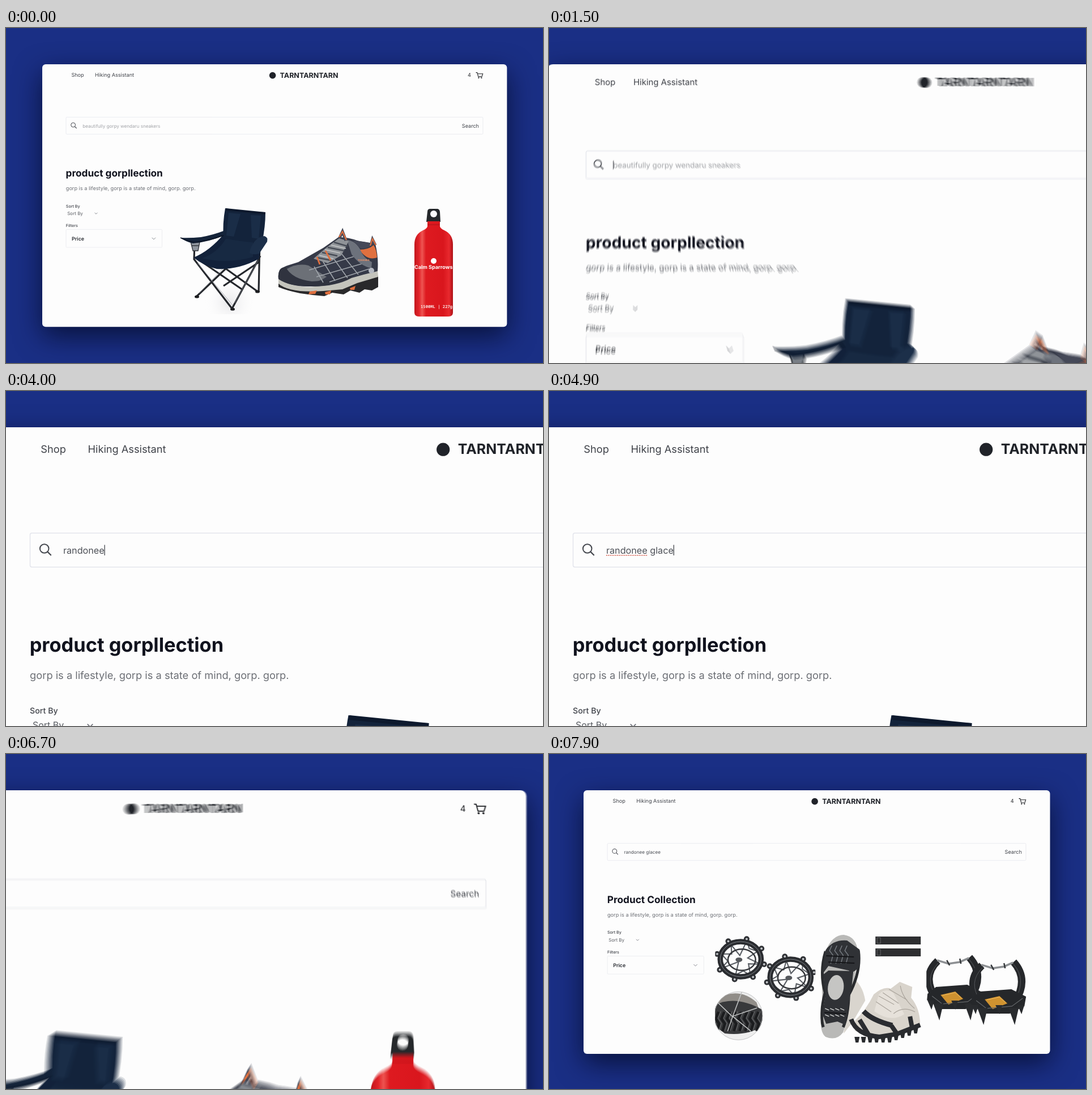
An HTML page with a canvas that plays this animation: 948x591 px, repeating every 8 s.

```html
<!DOCTYPE html>
<html lang="en">
<head>
<meta charset="utf-8">
<title>Shop search</title>
<style>
html, body { margin: 0; width: 100%; height: 100%; overflow: hidden; background: #1a2f85; }
canvas { display: block; }
</style>
</head>
<body>
<canvas id="stage" width="948" height="591"></canvas>
<script>
const W = 948, H = 591, LOOP = 8000;
const screen2d = document.getElementById('stage').getContext('2d');
const buffer = document.createElement('canvas');
buffer.width = W;
buffer.height = H;
const c = buffer.getContext('2d');

const CLICK = 1400, TYPE = 2700, KEY = 150, SUBMIT = 6450, RESULTS = 7550;
const QUERY = 'randonee glacee';
const INK = '#3f4249', BLACK = '#24262a';

// --- drawing helpers ---
function fill(color, d) {
  c.fillStyle = color;
  c.fill(new Path2D(d));
}
function line(color, w, d) {
  c.strokeStyle = color;
  c.lineWidth = w;
  c.stroke(new Path2D(d));
}
function oval(color, x, y, rx, ry = rx, turn = 0) {
  c.fillStyle = color;
  c.beginPath();
  c.ellipse(x, y, rx, ry, turn, 0, 7);
  c.fill();
}
function ring(color, w, x, y, rx, ry = rx) {
  c.strokeStyle = color;
  c.lineWidth = w;
  c.beginPath();
  c.ellipse(x, y, rx, ry, 0, 0, 7);
  c.stroke();
}
function text(str, x, y, size, color, weight = 400, family = 'Inter, sans-serif') {
  c.font = `${weight} ${size}px ${family}`;
  c.fillStyle = color;
  c.fillText(str, x, y);
  return c.measureText(str).width;
}
function box(x, y, w, h, r, color) {
  c.strokeStyle = color;
  c.lineWidth = 0.6;
  c.beginPath();
  c.roundRect(x, y, w, h, r);
  c.stroke();
}
const chevron = (x, y, r) => line('#6d7078', 0.8, `M${x - r} ${y - r / 2}l${r} ${r}l${r} ${-r}`);

function clipped(x, y, w, h, draw) {
  c.save();
  c.beginPath();
  c.rect(x, y, w, h);
  c.clip();
  draw();
  c.restore();
}

// --- camera ---
function spring(t, start, speed) {
  const u = Math.max(0, t - start) * speed / 1000;
  return 1 - (1 + u) * Math.exp(-u);
}
const zoom = t => 1 + spring(t, 1144, 6.1) - spring(t, 6493, 5.5);
const focus = t => 169.5 + 687.5 * spring(t, 5950, 7);
const shiftX = t => focus(t) * (1 - zoom(t));

// --- products before the search ---
function chair() {
  const glow = c.createRadialGradient(395, 485, 5, 395, 485, 45);
  glow.addColorStop(0, '#ececee');
  glow.addColorStop(1, '#fdfdfd00');
  c.fillStyle = glow;
  c.fillRect(345, 455, 100, 50);
  line('#24272c', 3.2, 'M333 378L332 408L399 495L449 402M337 473L398 415M443 464L376 416M449 330L446 466M345 412L418 462M448 412L384 455');
  line('#8b9098', 0.7, 'M338 415L400 489M445 410L404 485M341 468L392 415');
  for (const [x, y] of [[337, 474], [400, 496], [444, 465]]) oval('#1c1d20', x, y, 4, 2.6);
  fill('#8f959d', 'M326 377l16 1l-3 15h-9z');
  line('#33373d', 1.4, 'M326 377l16 1l-3 15h-9zM328 384h13');
  fill('#12213a', 'M384 364Q360 393 331 405Q350 420 372 425Q410 427 447 407L452 366z');
  fill('#172942', 'M388 372Q372 398 346 406Q390 417 436 404L436 374z');
  fill('#13233b', 'M387 318Q420 324 458 325Q458 350 452 379Q420 378 384 371Q382 345 387 318z');
  fill('#1a2d47', 'M393 326L414 328L402 368L389 366zM432 330L450 331L446 372L434 370z');
  fill('#0d192d', 'M388 318L458 325L457 329L387 322z');
  fill('#15243a', 'M308 370Q324 371 344 369Q366 365 384 358L384 366Q360 377 330 380Q317 377 308 370z');
  line('#0b1424', 1.4, 'M308 370Q324 378 336 378Q362 374 384 366');
  fill('#1c2f49', 'M431 391Q439 369 456 367Q463 369 461 377L447 398Q437 401 430 397z');
}

function shoe() {
  fill('#29292b', 'M481 446Q500 462 530 464L600 450L657 437V457L646 463L633 461L624 467L608 463L596 470L576 467L562 473L541 471L519 468Q495 463 481 457z');
  fill('#c4c4bc', 'M481 441Q505 457 538 457Q585 452 612 437Q636 430 656 426L657 439L620 450L594 461L560 464Q500 468 481 451z');
  fill('#e0703f', 'M536 465l13-2l-3 6l-12 1zM563 466l11-3l-2 7h-8zM607 459l10-4l-2 7h-7z');
  // Upper, from toe to collar and heel.
  fill('#363a48', 'M481 442Q478 424 500 418L516 413L560 388L587 369Q605 369 623 376Q640 378 652 381Q658 405 656 429Q634 434 610 441Q583 456 540 456Q500 457 481 442z');
  fill('#6c7077', 'M494 426Q514 414 534 419L566 439Q550 451 525 449Q502 446 494 426z');
  fill('#30333f', 'M481 443Q479 421 494 422Q505 443 540 447Q572 447 602 433L612 439Q584 455 541 456Q500 456 481 443z');
  line('#9fa4aa', 1.6, 'M544 421L560 449M559 411L581 446M575 402L603 441M593 399L622 435M535 427L628 399M548 439L635 414M571 448L641 425');
  fill('#e0703f', 'M624 391Q640 391 649 383Q654 390 655 405Q637 411 624 391z');
  fill('#6d727c', 'M602 374Q616 375 625 390Q631 407 646 413L645 424Q624 419 610 399z');
  fill('#454958', 'M611 374Q632 377 648 381Q640 390 626 389z');
  text('TOVANDA', 621, 411, 4.2, '#f29369', 700);
  oval('#b6bac2', 645, 428, 5);
  fill('#8f9398', 'M543 407Q566 386 588 371L605 376L592 401L568 415z');
  line('#484d57', 2.6, 'M549 405l25 5M558 396l27 6M568 387l29 6M579 378l24 7');
  line('#c8cacb', 1.5, 'M553 401l25 6M563 391l27 6M574 383l26 6');
  line('#e0703f', 2.8, 'M549 404l5 13M564 393l9 17');
  line('#454958', 5, 'M589 370l5-11l6 16M644 384l3-11l5 10');
  line('#e0703f', 2.2, 'M588 369l6-10l7 15M643 384l4-12l6 11');
}

function bottle() {
  fill('#25282b', 'M742 342l2-18q0-5 5-5h12q4 0 5 5l1 18z');
  oval('#fbfbfb', 755, 328, 6);
  const red = c.createLinearGradient(721, 0, 789, 0);
  [[0, '#c3161c'], [0.12, '#e3242a'], [0.2, '#ee5552'], [0.3, '#de1a20'], [0.75, '#d9161d'], [0.9, '#e8292e'], [1, '#ab1117']]
    .forEach(stop => red.addColorStop(...stop));
  fill(red, 'M744 341h22v9q1 4 8 7q15 7 15 25v120q0 7-8 7h-52q-8 0-8-7v-120q0-18 15-25q7-3 8-7z');
  line('#a5141a', 1, 'M744 347h22');
  oval('#ffffff', 755, 411, 5);
  clipped(721, 400, 67, 106, () => {
    text('Calm Sparrows', 721, 425, 9.1, '#fff', 700);
    text('1500ML | 227g', 732, 494, 7.2, '#f9dedc', 700, '"Noto Sans Mono", monospace');
  });
}

// --- products after the search ---
function chainRing(x, y, rx, ry, turn) {
  const at = (a, k) => [x + rx * k * Math.cos(a), y + ry * k * Math.sin(a)];
  let chain = '';
  for (let i = 0; i < 8; i++) {
    const a = turn + i * Math.PI / 4, reach = 0.4 + 0.25 * Math.sin(i * 2.3);
    const [px, py] = at(a, 1.02), [qx, qy] = at(a + 0.35, reach), [ex, ey] = at(a + 0.8, 0.8);
    chain += `M${px} ${py}L${qx} ${qy}L${ex} ${ey}`;
    oval('#303236', px, py, 5);
  }
  line('#5c6066', 2.2, chain);
  ring('#2a2c30', 9.5, x, y, rx * 0.86, ry * 0.86);
  ring('#8b8f93', 0.9, x, y, rx * 0.86, ry * 0.86);
  ring('#36383c', 2.5, x + 2, y + 1, rx * 0.58, ry * 0.52);
  for (let i = 0; i < 8; i++) {
    const [px, py] = at(turn + i * Math.PI / 4, 1.02);
    oval('#c2c5c8', px, py, 1.9);
  }
  oval('#55585c', x - 3, y + 1, 6, 4);
}

function chains() {
  chainRing(338, 362, 42, 36, 0.25);
  chainRing(426, 394, 42, 37, 0.55);
  c.save();
  c.beginPath();
  c.arc(334, 462, 43, 0, 7);
  c.clip();
  fill('#eeeeee', 'M290 418h90v90h-90z');
  fill('#918d88', 'M290 435Q333 408 366 438L372 455L290 462z');
  fill('#38393b', 'M290 444Q328 424 376 451L379 479Q350 498 310 493L290 478z');
  for (let i = 0; i < 8; i++) {
    line('#1b1c1e', 4.5, `M${299 + i * 10} 455l-5 12l6 9l-4 13`);
    line('#77797a', 0.9, `M${303 + i * 10} 454l-5 12l6 9l-4 13`);
  }
  line('#c0c2c2', 1.6, 'M298 439L323 463L367 448M315 489L324 463L356 489M340 420L324 463');
  c.restore();
  ring('#b9babb', 0.8, 334, 462, 42.5);
}

function grips() {
  for (const y of [322, 343]) {
    fill('#2d2e30', `M576 ${y}h80v14h-80z`);
    line('#6c6e70', 0.8, `M579 ${y + 2}h6v10h-6z`);
  }
  fill('#d9d5ce', 'M532 393Q553 404 558 435L535 474L520 493z');
  fill('#b9b9b7', 'M487 350Q499 319 520 319Q543 322 545 350Q542 395 529 430Q528 464 519 491Q507 507 488 499Q477 491 480 458Q484 423 480 397Q479 371 487 350z');
  line('#292b2e', 5, 'M488 348Q477 384 487 421Q477 461 484 482M546 347Q551 385 529 425Q528 461 519 482');
  fill('#303236', 'M488 346Q501 327 526 329L548 345L548 374Q536 390 529 382L493 374L482 389z');
  fill('#303236', 'M484 389L493 382L537 383L534 412L529 438L523 478L509 472L489 476L482 458L488 426z');
  oval('#c5c5c3', 506, 412, 14, 22, 0.12);
  for (let i = 0; i < 4; i++) {
    line('#7a7f85', 1.4, `M${499 + i * 9} 338l-4 9l6 8l-4 15`);
    line('#dadcda', 1.3, `M${487 + i * 9} 449l7 3M${487 + i * 9} 460l7 3`);
  }
  line('#141518', 2, 'M489 356l49 2M493 367l46 2M486 456l38 2');
  fill('#d9d4cc', 'M540 470Q560 451 573 424Q591 409 603 414L619 402L641 411L639 430Q655 449 655 479Q628 488 600 497Q564 501 540 488z');
  fill('#e6e1da', 'M582 424Q594 411 608 422L627 459Q603 475 574 454z');
  line('#aaa49c', 1.2, 'M582 427l27 15M589 421l28 19M577 437l27 18M600 415l32 19M620 409Q623 430 645 449M608 458Q625 444 646 455');
  line('#2a2c30', 9, 'M555 454Q570 470 606 479');
  line('#2a2c30', 8, 'M533 468Q543 496 583 499L614 494L655 478M604 479L615 495M637 463L641 484M548 469L565 497');
  for (let i = 0; i < 10; i++) {
    const x = 543 + i * 11.5, y = 507 - Math.max(0, i - 5) * 4;
    fill('#292b2e', `M${x - 4} ${y - 8}h9l-2 10h-5z`);
  }
}

function crampon(x, y) {
  line('#26282b', 13, `M${x - 27} ${y + 2}Q${x - 55} ${y - 38} ${x - 25} ${y - 66}M${x + 34} ${y - 2}Q${x + 58} ${y - 42} ${x + 31} ${y - 72}`);
  line('#5a5d60', 0.9, `M${x - 28} ${y - 4}Q${x - 50} ${y - 36} ${x - 24} ${y - 62}M${x + 34} ${y - 5}Q${x + 54} ${y - 42} ${x + 31} ${y - 68}`);
  line('#8d9093', 3.5, `M${x - 26} ${y - 67}l20 6l20-3l16-7`);
  line('#34373a', 2.5, `M${x - 9} ${y - 67}l5 9M${x + 14} ${y - 70}l2 9`);
  fill('#25272a', `M${x - 43} ${y - 8}l15-12l55-4l26 13l-3 17l-26 13h-43l-25-16z`);
  fill('#cf9230', `M${x - 20} ${y - 6}l26-6l14 13l-26 10z`);
  line('#ebb85d', 1, `M${x - 17} ${y - 5}l23-5l11 10`);
  line('#64676a', 1.2, `M${x - 35} ${y - 4}l18 14l45-4l19-14`);
  for (const dx of [-24, 31]) fill('#292b2e', `M${x + dx - 9} ${y + 9}h18l-7 30z`);
  for (const dx of [-37, 5, 44]) fill('#292b2e', `M${x + dx - 6} ${y + 4}h12l-5 16z`);
}

function products(t) {
  if (t < RESULTS) {
    clipped(293, 315, 177, 200, chair);
    clipped(480, 315, 177, 200, shoe);
    clipped(666, 315, 177, 200, bottle);
    return;
  }
  c.save();
  c.translate(3.64, 0.25);
  c.scale(0.996, 0.996);
  clipped(293, 315, 177, 200, chains);
  clipped(479, 315, 178, 200, grips);
  clipped(666, 315, 176, 200, () => {
    crampon(711, 431);
    crampon(789, 439);
  });
  c.restore();
}

// --- page ---
function header() {
  text('Shop', 115.4, 86.4, 9.1, INK);
  text('Hiking Assistant', 157, 86.4, 9.1, INK);
  oval('#202329', 470.6, 83.6, 5.8);
  text('TARNTARNTARN', 483.6, 87.6, 12.5, '#202329', 700);
  text('4', 815, 86.4, 9.1, BLACK);
  line(BLACK, 1.1, 'M829.5 78.6h2.3l2 7.3h6.2l1.7-5.2h-9');
  oval(BLACK, 834.4, 88, 1.1);
  oval(BLACK, 839.4, 88, 1.1);
}

function searchBar(t) {
  box(106, 157.3, 736, 30, 1.5, '#dfe1e9');
  ring('#45484f', 1, 118.6, 171, 3.9);
  line('#45484f', 1.1, 'M121.4 173.8l3.2 3.2');
  const typed = Math.max(0, Math.min(QUERY.length, Math.floor((t - TYPE) / KEY)));
  const x = 135.2, y = 175.6;
  let width = 0;
  if (typed) width = text(QUERY.slice(0, typed), x, y, 8.1, '#4d5057');
  else text('beautifully gorpy wendaru sneakers', x, y, 8.1, '#a2a4a8');
  const focused = t >= CLICK && t < SUBMIT;
  if (focused && typed > 8) {
    const word = c.measureText('randonee').width;
    c.setLineDash([0.9, 0.7]);
    line('#d8695b', 0.9, `M${x} 176.9h${word}`);
    c.setLineDash([]);
  }
  const end = TYPE + KEY * QUERY.length;
  const since = t < TYPE ? t - CLICK : Math.max(0, t - end);
  if (focused && since % 1000 < 500) line('#33363c', 0.6, `M${x + width + 0.2} 167.8v9.2`);
  text('Search', 804.8, 175.5, 9.1, INK);
}

function sidebar(t) {
  text(t < RESULTS ? 'product gorpllection' : 'Product Collection', 105.6, 262, 17.2, '#11131e', 700);
  text('gorp is a lifestyle, gorp is a state of mind, gorp. gorp.', 105.8, 286.2, 9.13, '#6c6f75');
  text('Sort By', 105.8, 316.5, 7.1, INK, 500);
  text('Sort By', 108.2, 329.7, 8, '#5b5e64');
  chevron(159, 327, 2.4);
  text('Filters', 105.8, 350.6, 7.1, INK, 500);
  box(106, 355.4, 169.5, 31.6, 1.5, '#e3e4ea');
  text('Price', 116, 374.6, 8.9, '#2a2d33', 600);
  chevron(260.8, 371.4, 3.2);
}

function paint(t, view) {
  const s = zoom(view), x = shiftX(view);
  c.setTransform(1, 0, 0, 1, 0, 0);
  c.fillStyle = '#1a2f85';
  c.fillRect(0, 0, W, H);
  c.setTransform(s, 0, 0, s, x, 64 * (1 - s));
  c.textRendering = 'geometricPrecision';
  c.save();
  c.shadowColor = 'rgba(2, 6, 28, 0.7)';
  c.shadowBlur = 48;
  c.shadowOffsetY = 16;
  c.fillStyle = '#fdfdfd';
  c.beginPath();
  c.roundRect(64, 64, 820.4, 463.2, 6);
  c.fill();
  c.restore();
  c.save();
  c.clip();
  header();
  searchBar(t);
  sidebar(t);
  products(t);
  c.restore();
}

// Average several camera positions for motion blur.
const SHUTTER = 18, SAMPLES = 7;
function render(t) {
  const a = t - SHUTTER / 2, b = t + SHUTTER / 2;
  const moving = Math.abs(zoom(a) - zoom(b)) * 800 + Math.abs(shiftX(a) - shiftX(b)) > 0.8;
  const n = moving ? SAMPLES : 1;
  for (let i = 0; i < n; i++) {
    paint(t, moving ? a + SHUTTER * i / (n - 1) : t);
    screen2d.globalAlpha = 1 / (i + 1);
    screen2d.drawImage(buffer, 0, 0);
  }
}

let start;
function tick(now) {
  start ??= now;
  render((now - start) % LOOP);
  requestAnimationFrame(tick);
}
requestAnimationFrame(tick);
</script>
</body>
</html>
```
